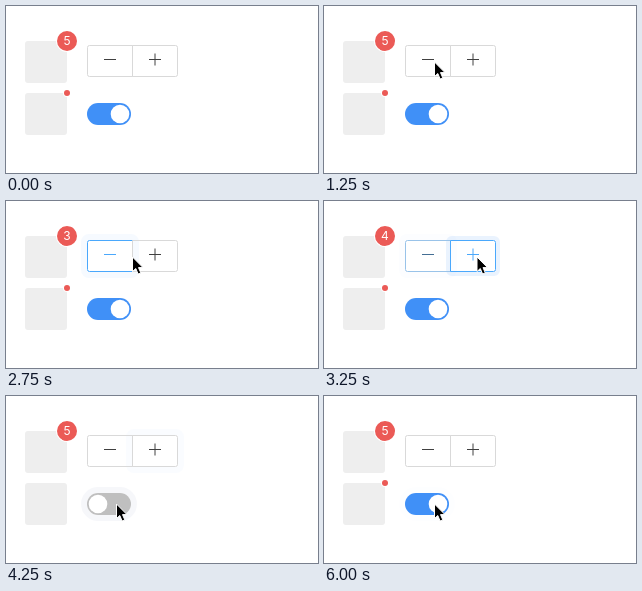
An HTML page for the animation above (6250 ms loop, 312 by 167 pixels).

```html
<!DOCTYPE html>
<html lang="en">
<head>
<meta charset="utf-8">
<title>Badge controls</title>
<style>
html, body { margin: 0; width: 100%; height: 100%; overflow: hidden; background: #fff; }
svg { display: block; }
text { font: 12px Inter, "Liberation Sans", sans-serif; fill: #fff; text-anchor: middle; }
.box { fill: #eee; }
.badge { fill: #eb5a56; stroke: #fff; stroke-width: 2; paint-order: stroke; }
.btn, .wave { fill: none; }
</style>
</head>
<body>
<svg width="312" height="167" viewBox="0 0 312 167">
  <rect class="box" x="19" y="35" width="42" height="42" rx="3"/>
  <rect class="box" x="19" y="87" width="42" height="42" rx="3"/>
  <circle class="badge" cx="61" cy="35" r="10"/>
  <text id="count" x="61" y="39.4">5</text>
  <circle id="dot" class="badge" cx="61" cy="87"/>

  <rect id="minusWave" class="wave"/>
  <rect id="plusWave" class="wave"/>
  <g id="minus" class="btn">
    <path d="M126.5 39.5H83.5a2 2 0 0 0-2 2V68.5a2 2 0 0 0 2 2H126.5z"/>
    <path class="glyph" d="M98 53.5h12"/>
  </g>
  <g id="plus" class="btn">
    <path d="M126.5 39.5H169.5a2 2 0 0 1 2 2V68.5a2 2 0 0 1-2 2H126.5z"/>
    <path class="glyph" d="M143 53.5h12M149 47.5v12"/>
  </g>

  <rect id="switchWave" class="wave"/>
  <rect id="track" x="81" y="97" width="44" height="22" rx="11"/>
  <circle id="knob" cy="108" r="9.3" fill="#fff"/>

  <path id="cursor" d="M0 0V14.5L3.3 11.5 5.6 17 8.3 15.9 6 10.6H10.5z"
    fill="#000" stroke="#fff" stroke-linejoin="round"/>
</svg>
<script>
const STEP = 250, LOOP = 6250;
const GREY = [217, 217, 217], DARK = [64, 64, 64], HOVER = [74, 168, 252];
const OFF = [191, 191, 191], BLUE = [64, 144, 247], HALO = [130, 145, 185];

// Click times in ms
const clicks = { minus: [1900, 2150], plus: [3150, 3400], switch: [3900, 4650] };
const [switchOff, switchOn] = clicks.switch;
const home = { x: 137, y: -20 };
const moves = [
  { t: 625, x: 110.5, y: 56 },
  { t: 2500, x: 126.5, y: 56 },
  { t: 2750, x: 153, y: 56 },
  { t: 3250, x: 110.5, y: 108 }
];

const el = id => document.getElementById(id);
const set = (node, attrs) => {
  for (const name in attrs) node.setAttribute(name, attrs[name]);
};
const lerp = (a, b, p) => a + (b - a) * p;
const mix = (a, b, p) => `rgb(${a.map((v, i) => Math.round(lerp(v, b[i], p)))})`;
const clamp = p => Math.min(1, Math.max(0, p));
const ramp = (t, from, ms = 300) => 1 - (1 - clamp((t - from) / ms)) ** 2;
const circOut = p => Math.sqrt(1 - (1 - clamp(p)) ** 2);
const past = (id, t) => clicks[id].filter(c => c <= t);

function pointer(t) {
  return moves.reduce((from, to) => {
    const p = ramp(t, to.t, 250);
    return { x: lerp(from.x, to.x, p), y: lerp(from.y, to.y, p) };
  }, home);
}

// A halo grows quickly after a click and fades over two seconds.
function wave(id, t, x, y, w, h, r, color) {
  const age = t - (past(id, t).pop() ?? -LOOP);
  const spread = 6 * circOut(age / 400), half = spread / 2;
  set(el(id + "Wave"), {
    x: x - half, y: y - half, width: w + spread, height: h + spread, rx: r + half,
    stroke: color, "stroke-width": spread,
    "stroke-opacity": 0.16 * (1 - circOut(age / 2000))
  });
}

function button(id, t, from, to) {
  const p = ramp(t, from) - ramp(t, to), g = el(id);
  set(g, { stroke: mix(GREY, HOVER, p) });
  set(g.querySelector(".glyph"), { stroke: mix(DARK, HOVER, p) });
}

function draw(t) {
  const tip = pointer(t);
  set(el("cursor"), { transform: `translate(${tip.x} ${tip.y})` });

  el("count").textContent = 5 - past("minus", t).length + past("plus", t).length;
  button("minus", t, 1300, clicks.plus[0]);
  button("plus", t, 2900, switchOff);
  // The shared border belongs to minus only while the pointer is on it.
  const overMinus = tip.x < 126 && tip.y < 71;
  if (overMinus) el("plus").after(el("minus"));
  else el("minus").after(el("plus"));

  const on = 1 - ramp(t, switchOff) + ramp(t, switchOn);
  set(el("track"), { fill: mix(OFF, BLUE, on) });
  set(el("knob"), { cx: lerp(92, 114, on) });
  set(el("dot"), { r: 3 * on, "stroke-opacity": on });

  const blue = mix(BLUE, BLUE, 0);
  wave("minus", t, 81, 39, 46, 32, 2, blue);
  wave("plus", t, 126, 39, 46, 32, 2, blue);
  wave("switch", t, 81, 97, 44, 22, 11, mix(HALO, BLUE, on));
}

const start = performance.now();
function tick() {
  const t = (performance.now() - start) % LOOP;
  draw(Math.floor(t / STEP) * STEP);
  requestAnimationFrame(tick);
}
tick();
</script>
</body>
</html>
```
